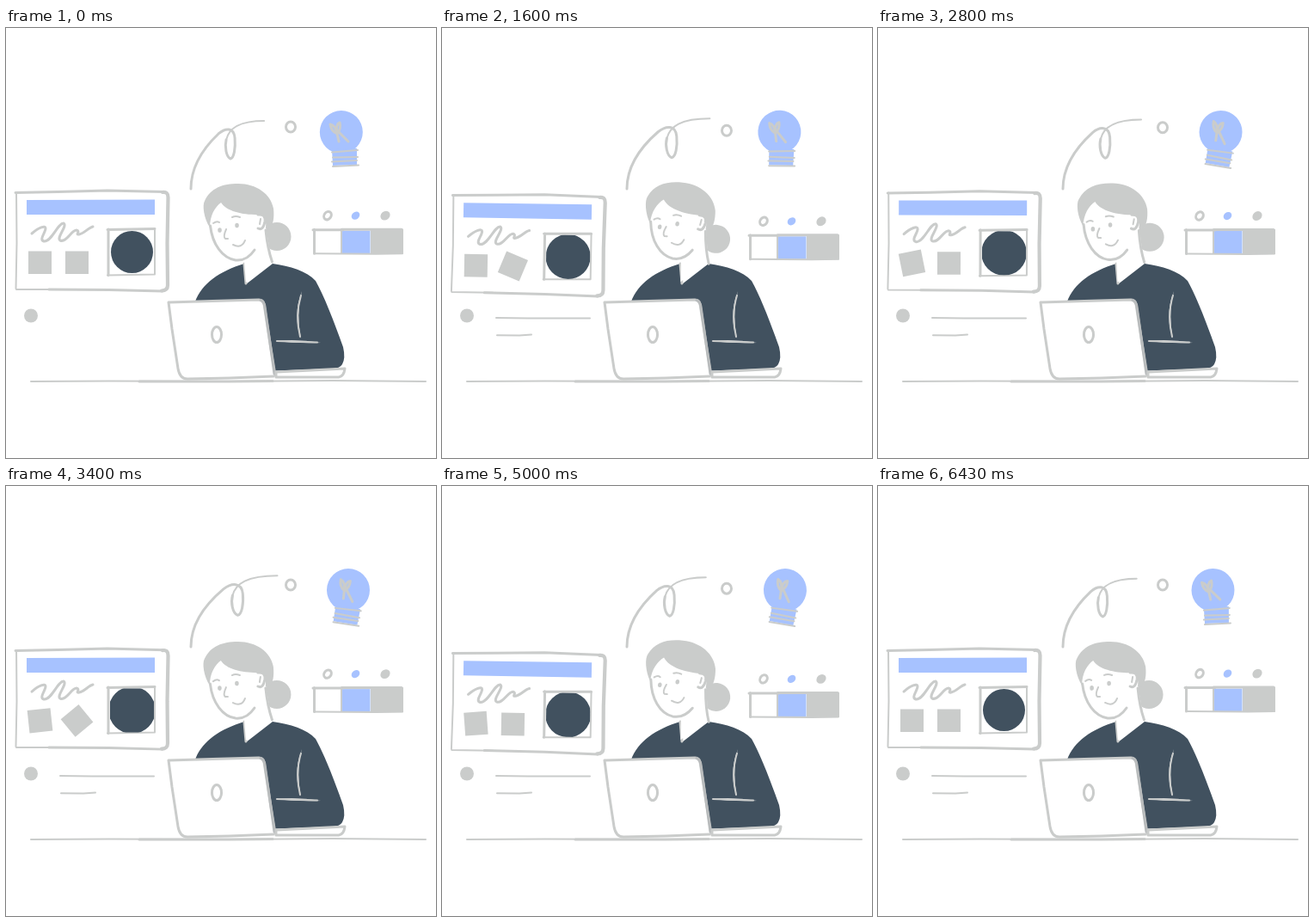
An HTML page for the animation above (6.51 s loop, 500 by 500 pixels).

```html
<!DOCTYPE html>
<html lang="en">
<head>
<meta charset="utf-8">
<title>Designer at work</title>
<style>
  html, body { margin: 0; width: 100%; height: 100%; overflow: hidden; background: #fff; }
  svg { display: block; width: 100vw; height: 100vh; }
  .line { fill: none; stroke: #cacccb; stroke-width: 3; stroke-linecap: round; stroke-linejoin: round; vector-effect: non-scaling-stroke; }
  .thin { stroke-width: 2; }
  .bold { stroke-width: 4.2; }
  .grey { fill: #cacccb; }
  .blue { fill: #a7c2ff; }
  .dark { fill: #41515f; }
  .white { fill: #fff; }
  .fold { fill: #d3d5d6; }
</style>
</head>
<body>
<svg viewBox="0 0 500 500">
  <clipPath id="window"><rect x="121" y="235.500" width="51" height="51"/></clipPath>

  <path class="line thin" d="M29 411 L120 410.500 L260 411 L380 410 L488 411"/>
  <path class="line" d="M155 411 L260 411 L310 410.500"/>
  <circle class="grey" cx="29" cy="334.500" r="8"/>
  <path class="line thin" id="text1" d="M63 337 L100 337.500 L172 337.500"/>
  <path class="line thin" id="text2" d="M64 357.300 L90 357.500 L104 356.500"/>

  <g id="panel">
    <path class="line thin" d="M12 191 L12.500 250 L11.500 303 M12 304 L60 304"/>
    <path class="line" d="M11 191.500 L60 190.500 L118 189 L184 190.500"/>
    <path class="line" d="M50 304 L120 304.500 L182 306"/>
    <path class="line bold" d="M182 191 Q188.500 190 188.500 197 L187.500 250 L188 299 Q188 305.500 181 305.500"/>
    <path class="blue" d="M24 200 L173 199.500 L173 217 L24 217 Z"/>
    <path class="line" d="M30 239 C38 232 46 229 46 233 C46 238 38 246 44 248 C53 249 60 227 67 227 C72 230 58 244 63 247 C70 250 76 235 82 235 C87 236 80 241 85 240 C91 239 96 232 101 231"/>
    <rect class="grey" id="left" x="26" y="259.500" width="27" height="26.500"/>
    <rect class="grey" id="right" x="69" y="259.500" width="27" height="26.500"/>
    <path class="line" d="M119 234 L119 287.500 M118 234.500 L173 233.500"/>
    <path class="line thin" d="M118 287.500 L173 286.500 M173 234 L173 286"/>
    <g clip-path="url(#window)"><circle class="dark" id="disc" cx="146.500" cy="260.500" r="24.500"/></g>
  </g>

  <g id="swirl">
    <path class="line" d="M215 187 C215 165 226 143 247 123 C255 116 265 115 266 128 C267 140 265 151 261 152 C256 150 254 138 256 130"/>
    <path class="line thin" d="M256 130 C259 117 270 108 300 108"/>
  </g>
  <ellipse class="line" id="ring" cx="331" cy="115" rx="5.500" ry="6"/>

  <g id="bulb">
    <circle class="blue" cx="389.800" cy="121" r="25"/>
    <path class="blue" d="M379 141 L408 140 L408 159 L380 160 Z"/>
    <path class="line thin" d="M379 144.500 L409 142 M380 150.500 L409 150 M379 155.500 L408 154 M380 161 L410 159.500"/>
    <g id="filament">
      <path class="line" d="M377 112 Q378 120 385 123 Q390 117 388 110 Q383 112 385 123 Q383 113 377 112 M385 123 L387 132 M387 121 L398 132"/>
    </g>
  </g>

  <g id="palette">
    <rect class="grey" x="424" y="233.500" width="38" height="29"/>
    <rect class="white" x="358" y="234" width="33" height="28"/>
    <rect class="blue" x="390.500" y="235.500" width="33" height="26.500"/>
    <path class="line" d="M358.500 234 L358.500 262 M357 234.500 L392 234.500 M390 234 L460 234"/>
    <path class="line thin" d="M359 262 L430 262.500 L461 262 M390 235 L390 261"/>
    <ellipse class="line" cx="374" cy="218" rx="4" ry="5" transform="rotate(35 374 218)"/>
    <ellipse class="blue" cx="406.500" cy="218" rx="5.200" ry="4.200" transform="rotate(-40 406.500 218)"/>
    <ellipse class="grey" cx="441" cy="218" rx="6" ry="5" transform="rotate(-40 441 218)"/>
  </g>

  <path class="dark" d="M220 318 C228 297 248 283 277 274 L279 298 L310 274 C330 276.500 350 283 360 294 C370 312 381 340 392 371 Q395 384 391 391 Q388 396 380 396 L300 399 L290 318 Z"/>
  <path class="fold" d="M344 306 Q337 334 343 361 Q333 335 344 306 Z"/>
  <path class="line thin" d="M343 311 Q336 334 342 359"/>
  <path class="fold" d="M313 364 Q338 361 366 366 Q338 367 313 364 Z"/>
  <path class="line thin" d="M315 364 L362 365.500"/>

  <path class="line" d="M277 274 L279 297"/>
  <g id="head">
    <circle class="grey" cx="315" cy="242.500" r="16.500"/>
    <path class="white" d="M237 226 L252 206 L300 214 L303 237 L309 272 L279 296 L277 271 L266 271 C249 265 239 251 237 226 Z"/>
    <path class="line" d="M237.500 230 C240 252 252 268 267 270 C278 271 285 264 289 258"/>
    <path class="line" d="M302 235 Q304 256 309.500 272"/>
    <path class="grey" d="M237 232 C230 221 228 206 231 201 C238 186 252 181 270 181 C291 181 308 193 311 210 C312 220 311 229 306 234 L302 233 Q303 221 298 217 C278 218 257 214 250 203 C243 208 237 218 237 232 Z"/>
    <path class="line" d="M293 217 Q302 216 301 225 Q299 236 293 233"/>
    <path class="line thin" d="M296 222 L295 228"/>
    <path class="line thin" d="M241 227 Q245 224 248 226 M263 220 Q267 218 272 220 M256 234 Q252 243 255 245 L258 245"/>
    <path class="line thin" d="M264 252 Q274 257 278 247"/>
    <ellipse class="grey" cx="248.500" cy="235" rx="2.300" ry="2.800"/>
    <ellipse class="grey" cx="268.500" cy="229.500" rx="2.300" ry="2.800"/>
  </g>

  <path class="white" d="M189 319 L294 316 Q299 316 300 321 L313 403 L207 408 Q202 406 201 400 Z"/>
  <path class="line" d="M190 319 L240 317.500 L294 316 Q299 316 300 321 L306 360 L313 404"/>
  <path class="line" d="M189 319 L193 350 L200 396 Q202 408 211 408 L260 407 L311 405"/>
  <path class="line" style="stroke:#b9bcbd" d="M296 316.500 Q300 318 301 324 L312 402"/>
  <ellipse class="line" cx="245" cy="356.500" rx="5.500" ry="9"/>
  <path class="line" style="fill:#fff" d="M314 400 L355 398 L394 396 Q393 405 387 406 L345 406 L314 406 Z"/>
</svg>
<script>
const LOOP = 6510, FRAMES = 130;
const el = {};
document.querySelectorAll('[id]').forEach(node => el[node.id] = node);

const clamp = x => Math.min(1, Math.max(0, x));
const smooth = x => x * x * (3 - 2 * x);
const cubic = x => x < .5 ? 4 * x ** 3 : 1 - 4 * (1 - x) ** 3;
const span = (x, from, to) => clamp((x - from) / (to - from));
const set = (id, value) => el[id].setAttribute('transform', value);

// The picture advances at 0 and 30 ms of every 100 ms.
function frameAt(ms) {
  const t = ms % LOOP;
  return Math.min(FRAMES - 1, Math.floor(t / 100) * 2 + (t % 100 >= 30 ? 1 : 0));
}

function drawLine(id, amount) {
  const path = el[id], length = path.getTotalLength();
  path.style.visibility = amount > 0 ? 'visible' : 'hidden';
  path.style.strokeDasharray = `${length * amount} ${length + 10}`;
}

function render(ms) {
  const frame = frameAt(ms), time = frame * 50, cycle = frame / FRAMES;
  const wave = (turns, shift = 0) => (1 - Math.cos(2 * Math.PI * (turns * cycle + shift))) / 2;
  const slow = wave(2), head = wave(2, -.05), bulb = wave(3, .08) - .06, swirl = wave(3, -.07) - .04;
  const phase = cycle * 3 % 1;

  set('panel', `translate(${1.2 * slow} ${3 * slow}) rotate(${slow} 11 200)`);
  set('ring', `translate(0 ${4.2 * slow})`);
  set('palette', `translate(0 ${6.9 * wave(2, .05)})`);
  set('head', `rotate(${6 * (head - .02)} 288 280)`);
  set('bulb', `rotate(${15.5 * bulb} 394 162)`);
  set('filament', `rotate(${10 * bulb} 388 126)`);
  set('swirl', `translate(215 187) scale(${1 + .19 * swirl} ${1 + .05 * swirl}) translate(-215 -187)`);
  set('left', `rotate(${180 * smooth(span(phase, 0, .64))} 39.5 272.75)`);
  set('right', `rotate(${-180 * cubic(span(phase, .36, .91))} 82.5 272.75)`);
  el.disc.setAttribute('r', 24.5 + 3 * wave(3));
  drawLine('text1', smooth(span(time, 100, 900)));
  drawLine('text2', smooth(span(time, 850, 1400)));
}

const start = performance.now();
function tick() {
  render(performance.now() - start);
  requestAnimationFrame(tick);
}
tick();
</script>
</body>
</html>
```
